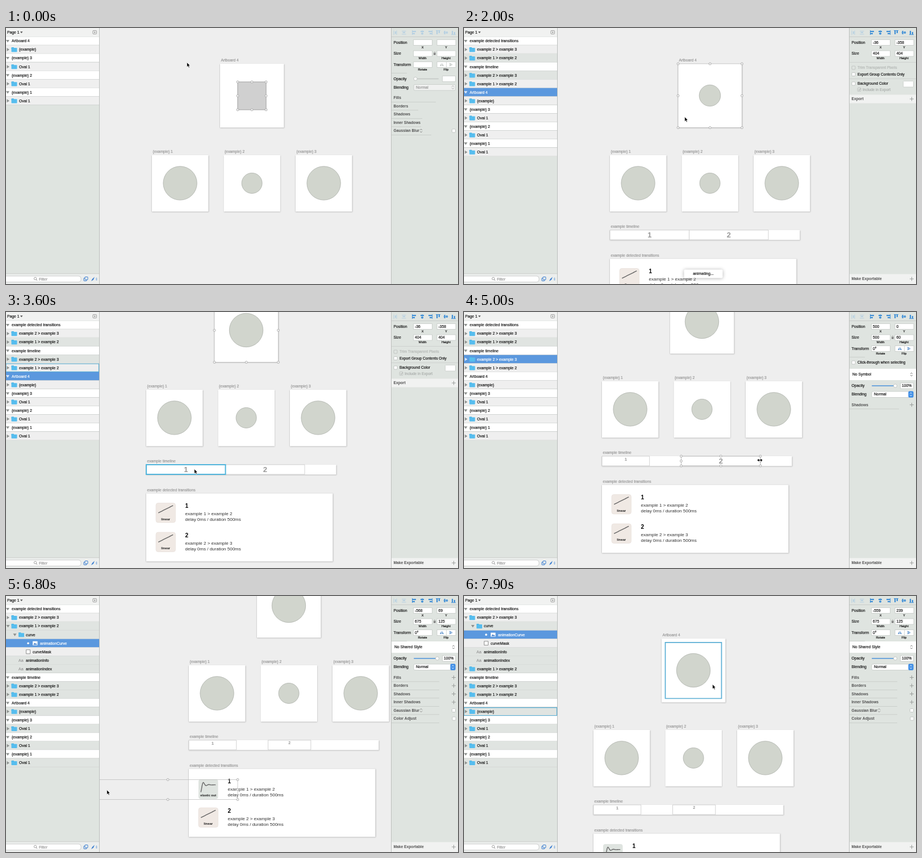
Animation of 796x451 px, one loop 8 s. Source, as an HTML page with a canvas:

```html
<!DOCTYPE html>
<html lang="en">
<head>
<meta charset="utf-8">
<title>Timeline editing</title>
<style>
html, body { margin: 0; width: 100%; height: 100%; overflow: hidden; background: #eee; }
canvas { display: block; width: 796px; height: 451px; }
</style>
</head>
<body>
<canvas id="stage" width="796" height="451"></canvas>
<script>
const c = document.getElementById('stage').getContext('2d');
const LOOP = 8000, STEP = 100;
const FONT = '"Liberation Sans", Arial, sans-serif';
const BLUE = '#5aaed4', PANEL = '#dfe4e0', INK = '#1a1a1a', GREY = '#999';
const SHAPE = '#d1d5cd', EDGE = '#adb0aa';
const UNIT = 0.279; // stage pixels per document unit

// Motion tables: [time, values...], linear between rows
const SCROLL = [[0, 0, 0], [2500, 0, 0], [2700, -8, -42], [2800, -24, -75], [3100, -10, -87],
  [3600, -10, -87], [4000, -14, -102], [5500, -14, -102], [5900, 65, -102], [7400, 65, -102], [7800, -29, 12]];
const POINTER = [[0, 319, 61], [300, 319, 61], [1000, 444, 115], [1500, 444, 115], [2300, 356, 182], [2800, 356, 182],
  [3500, 332, 277], [3700, 332, 277], [3900, 332, 261], [4200, 383, 261], [4500, 327, 261], [4700, 450, 261],
  [4900, 521, 261], [5000, 521, 261], [5400, 457, 261], [6000, 354, 342], [6300, 354, 342], [6700, 178, 342],
  [6800, 178, 342], [7000, 356, 389], [7300, 180, 389], [7500, 180, 389], [7900, 438, 156]];
const RADIUS = [[1000, 29.7], [1200, 29.7], [1950, 18], [2700, 29.7]];
const WIDTH1 = [[4200, 500], [4500, 300]];
const WIDTH2 = [[5000, 500], [5400, 270]];
const DRAG1 = [[6300, 0], [6700, -176]];
const DRAG2 = [[7000, 0], [7300, -176]];

function at(keys, t) {
  let i = keys.findIndex(k => k[0] > t);
  if (i === 0) return keys[0].slice(1);
  if (i < 0) return keys[keys.length - 1].slice(1);
  const a = keys[i - 1], b = keys[i], p = (t - a[0]) / (b[0] - a[0]);
  return a.slice(1).map((v, n) => v + (b[n + 1] - v) * p);
}

// Picks the value of the last step that has begun
const pick = (steps, t) => steps.filter(s => s[0] <= t).pop()[1];

function text(s, x, y, size = 6.75, color = INK, bold = false, align = 'left') {
  c.font = `${bold ? 'bold ' : ''}${size}px ${FONT}`;
  c.textAlign = align;
  c.fillStyle = color;
  c.fillText(s, x, y + size * 0.35);
  if (bold || size > 7.5) return;
  // Small labels are a little heavier than regular
  c.strokeStyle = color;
  c.lineWidth = 0.2;
  c.strokeText(s, x, y + size * 0.35);
}

function rect(x, y, w, h, fill, stroke, r = 0, lw = 1) {
  c.beginPath();
  c.roundRect(x, y, w, h, r);
  if (fill) { c.fillStyle = fill; c.fill(); }
  if (stroke) { c.strokeStyle = stroke; c.lineWidth = lw; c.stroke(); }
}

function path(points, stroke, lw = 1, fill) {
  c.beginPath();
  points.forEach(([x, y]) => c.lineTo(x, y));
  if (fill) { c.closePath(); c.fillStyle = fill; c.fill(); }
  if (stroke) { c.strokeStyle = stroke; c.lineWidth = lw; c.stroke(); }
}

function disc(x, y, r, fill, stroke, lw = 1) {
  c.beginPath();
  c.arc(x, y, r, 0, 7);
  c.fillStyle = fill;
  c.fill();
  if (stroke) { c.strokeStyle = stroke; c.lineWidth = lw; c.stroke(); }
}

function shadowed(x, y, w, h, r = 0, blur = 2) {
  c.save();
  c.shadowColor = 'rgba(0,0,0,.32)';
  c.shadowBlur = blur;
  c.shadowOffsetY = 0.6;
  rect(x, y, w, h, '#fff', null, r);
  c.restore();
}

function artboard(name, x, y, w, h) {
  shadowed(x, y, w, h);
  text(name, x + 1.5, y - 6, 6.7, GREY);
}

function handles(x, y, w, h) {
  rect(x, y, w, h, null, '#b8b8b8', 0, 0.7);
  for (const i of [0, 0.5, 1]) for (const j of [0, 0.5, 1])
    if (i !== 0.5 || j !== 0.5) disc(x + w * i, y + h * j, 2, '#f4f4f4', '#a4a4a4', 0.8);
}

/* ---------- canvas ---------- */

const elastic = p => 1 - Math.pow(2, -9 * p) * Math.cos(p * 17);
const CURVES = [p => p, p => p * p, p => 1 - (1 - p) ** 2, p => p * p * (3 - 2 * p), p => 1 - (1 - p) ** 4, elastic];
const NAMES = ['linear', 'ease in', 'ease out', 'ease both', 'expo out', 'elastic out'];

function curveIcon(x, y, dx) {
  const dragged = dx < -170;
  c.save();
  rect(x, y + (dragged ? 1.5 : 0), 34.5, 34.5, dragged ? PANEL : '#f0e9e4', dragged ? null : '#e6ddd8', 4, 0.6);
  c.clip();
  CURVES.forEach((f, i) => {
    const left = x + dx + i * 35.2, last = i === 5;
    if (Math.abs(left - x) > 35) return;
    const pts = [];
    for (let p = 0; p <= 1.001; p += 0.04)
      pts.push([left + 4.2 + p * 26, y + (last ? 24 - 12.8 * f(p) : 17.4 - 13 * f(p))]);
    path(pts, '#666', 1.4);
    text(NAMES[i], left + 17.2, y + (last ? 30 : 28), last ? 5.6 : 5.9, INK, true, 'center');
  });
  c.restore();
}

function transition(n, x, y, dx) {
  curveIcon(x, y, dx);
  text(n, x + 51.4, y + 5.3, 10, '#000', true);
  text(`example ${n} > example ${n + 1}`, x + 51.5, y + 18.8, 8, '#333');
  text('delay 0ms / duration 500ms', x + 51.5, y + 28.8, 8, '#333');
}

function bar(n, x, y, units) {
  const w = units * UNIT, k = units / 500;
  rect(x, y, w, 17, '#fff', '#c8c8c8', 0, 0.8);
  text(n, x + w / 2, y + 8.3 * k, 13 * k, GREY, true, 'center');
}

function drawCanvas(t) {
  const [ox, oy] = at(SCROLL, t).map(Math.round);
  const built = t >= 500;
  c.fillStyle = '#eee';
  c.fillRect(0, 0, 796, 451);
  c.save();
  c.translate(ox, oy);

  artboard('Artboard 4', 377, 63, 112.5, 112.5);
  if (!built) {
    rect(408, 95, 50, 49, '#d0d0d0', '#aaa');
    handles(408, 95, 50, 49);
  } else {
    const shift = t < 1100 ? 25 : 0;
    disc(433 + shift, 119 + shift, at(RADIUS, t)[0], SHAPE, EDGE, 0.8);
    if (t < 3900) handles(377, 63, 112.5, 112.5);
    if (t >= 900 && t < 1100) rect(408, 94.5, 99, 98.5, null, BLUE, 0, 1.7);
    if (t >= 7800) rect(383.5, 69.8, 99, 98.7, null, BLUE, 0, 1.7);
  }

  [257, 383.5, 510].forEach((x, i) => {
    artboard(`{example} ${i + 1}`, x, 224, 99.5, 99.5);
    disc(x + 49.6, 273.4, i === 1 ? 18 : 29.7, SHAPE, EDGE, 0.8);
  });

  if (built) {
    const w1 = at(WIDTH1, t)[0], w2 = at(WIDTH2, t)[0], y = 356;
    artboard('example timeline', 257, y, 334.5, 17.5);
    bar(1, 257, y, w1);
    bar(2, 396.5, y, w2);
    if (t >= 3500 && t < 3900) rect(257, y, 139.5, 17, null, '#52b5dc', 0, 2);
    if (t >= 3900 && t < 4700) handles(257, y, w1 * UNIT, 17);
    if (t >= 4700 && t < 6200) handles(396.5, y, w2 * UNIT, 17);

    artboard('example detected transitions', 257, 406.5, 328.5, 120);
    const d1 = at(DRAG1, t)[0], d2 = at(DRAG2, t)[0];
    transition(1, 274, 423.5, d1);
    transition(2, 274, 475, d2);
    if (t >= 6200) handles(273 + (t < 7000 ? d1 : d2), t < 7000 ? 425.5 : 477, 246, 35);
  }
  c.restore();

  if (t >= 700 && t < 3100) {
    shadowed(387.5, 425.5, 68, 15, 2, 6);
    text('animating...', 421.5, 433, 7.1, INK, false, 'center');
  }
}

/* ---------- layer list ---------- */

const PAIRS = ['example 2 > example 3', 'example 1 > example 2'];
const INNER = [['curve', 'sub'], ['animationCurve', 'image'], ['curveMask', 'mask'], ['animationInfo', 'type'], ['animationIndex', 'type']];

// Each row: [name, kind, dark]
function layerRows(built, open) {
  const rows = [], dark = open >= 0;
  if (built) {
    rows.push(['example detected transitions', 'board']);
    PAIRS.forEach((p, i) => {
      rows.push([p, i === open ? 'open' : 'folder', i === 1]);
      if (i === open) rows.push(...INNER);
    });
    rows.push(['example timeline', 'board'], [PAIRS[0], 'folder', true], [PAIRS[1], 'folder', dark]);
  }
  rows.push(['Artboard 4', 'board'], ['{example}', 'folder', dark]);
  for (const n of [3, 2, 1]) rows.push([`{example} ${n}`, 'board'], ['Oval 1', 'folder', dark]);
  return rows;
}

function arrow(x, y, down, color = '#8d918f') {
  path(down ? [[x - 3, y - 2], [x + 3, y - 2], [x, y + 2.5]] : [[x - 2, y - 3], [x + 2.5, y], [x - 2, y + 3]], null, 0, color);
}

function folder(x, y) {
  rect(x, y - 4, 4.5, 3, '#45b0e2', null, 0.6);
  rect(x, y - 3, 10, 7.2, '#56bdee', null, 0.8);
}

function layerRow([name, kind, dark], y, selected, hover) {
  const h = 15.05, top = y - 7.5, ink = selected ? '#fff' : INK;
  let fill = kind === 'board' ? '#fff' : dark || kind === 'type' || kind === 'sub' ? '#e0e4e1' : '#efefef';
  if (selected) fill = '#5b98de';
  rect(0, top, 164, h, fill);
  rect(0, top + h - 0.8, 164, 0.8, kind === 'board' ? '#c3c6c4' : '#d3d6d4');
  const tri = selected ? '#dfeafa' : undefined;
  let x = 23;
  if (kind === 'board') { x = 10; arrow(3, y, true, tri); }
  if (kind === 'folder' || kind === 'open') { arrow(3.5, y, kind === 'open', tri); folder(9.5, y); }
  if (kind === 'sub') { x = 35; arrow(15.5, y, true); folder(22, y); }
  if (kind === 'image') {
    x = 60;
    disc(39, y, 1.8, '#fff');
    rect(47, y - 3.5, 8.5, 7, '#fff');
    path([[48, y + 2.5], [50.5, y - 1], [52, y + 1], [53, y], [55, y + 2.5]], null, 0, '#4b86cf');
  }
  if (kind === 'mask') { x = 47; rect(35.5, y - 3.5, 7, 7, '#fff', '#777', 0, 0.8); }
  if (kind === 'type') { x = 35; text('Aa', 22, y, 7, GREY); }
  text(name, x, y, 6.75, ink);
  if (hover) rect(0, top + 0.5, 163.5, h - 1, null, BLUE, 0, 1.2);
}

function magnifier(x, y) {
  disc(x, y - 0.5, 2.2, '#fff', '#888', 0.8);
  path([[x + 1.6, y + 1.2], [x + 3.5, y + 3]], '#888');
}

function drawLayers(t) {
  rect(0, 0, 164, 451, PANEL);
  rect(0, 0, 164, 15.5, '#f1f2f1');
  text('Page 1', 2, 7.5);
  path([[25, 6.2], [29.5, 6.2], [27.2, 9.2]], null, 0, '#555');
  rect(153, 4.5, 6.5, 6, null, '#888', 1, 0.8);
  path([[154.8, 6.8], [157.8, 6.8], [156.3, 9]], null, 0, '#777');
  rect(0, 15, 164, 0.8, '#c3c6c4');

  const open = pick([[0, -1], [6200, 1], [7000, 0]], t);
  const selected = pick([[0, -1], [500, 6], [3900, 5], [4700, 4], [7000, 3]], t);
  const hover = pick([[0, -1], [3500, 5], [3900, -1], [7800, 12]], t);
  layerRows(t >= 500, open).forEach((row, i) => layerRow(row, 23 + i * 15.05, i === selected, i === hover));

  rect(0, 433, 164, 18, '#eceeed');
  rect(0, 432.5, 164, 0.8, '#c3c6c4');
  rect(-4, 437, 136, 10.5, '#fff', '#c3c6c4', 4, 0.8);
  magnifier(51.5, 442);
  text('Filter', 58, 442.3, 6.75, GREY);
  rect(137, 440.5, 5, 5, '#eceeed', '#3c7fd0', 0.5);
  rect(139, 438.5, 5, 5, '#eceeed', '#3c7fd0', 0.5);
  path([[150, 446], [152, 442], [156, 438.5], [154, 443.5]], null, 0, '#3c7fd0');
  path([[158, 441.6], [160.8, 441.6], [159.4, 440]], null, 0, '#3c7fd0');
  path([[158, 443], [160.8, 443], [159.4, 444.6]], null, 0, '#3c7fd0');
  rect(164, 0, 1, 451, '#bcbfbd');
}

/* ---------- inspector ---------- */

function field(x, y, value, w = 33) {
  rect(x, y - 5, w, 10, '#fff', '#c5c9c6', 0, 0.8);
  text(value, x + 2.5, y);
}

const caption = (s, x, y) => text(s, x, y, 5.5, INK, false, 'center');
const check = (y, x = 683, fill = '#fff') => rect(x, y - 3, 6, 6, fill, '#b9bdba', 1, 0.8);

function plus(y) {
  path([[785, y], [792, y]], '#929694', 0.9);
  path([[788.5, y - 3.5], [788.5, y + 3.5]], '#929694', 0.9);
}

function updown(x, y, color = '#666') {
  path([[x - 2, y - 1], [x, y - 3], [x + 2, y - 1]], color, 0.8);
  path([[x - 2, y + 1], [x, y + 3], [x + 2, y + 1]], color, 0.8);
}

function heading(s, y, add, line) {
  text(s, 682.5, y, 6.7, '#505050', true);
  if (add) plus(y);
  if (line) rect(679, y + 7, line, 0.7, '#c3c8c4');
}

function geometry([x, y, w, h], rotate) {
  text('Position', 682.5, 25.5);
  field(717.5, 25.5, x);
  field(759, 25.5, y);
  caption('X', 733.5, 34);
  caption('Y', 775, 34);
  text('Size', 682.5, 45);
  field(717.5, 45, w);
  field(759, 45, h);
  caption('Width', 733.5, 53.5);
  caption('Height', 775, 53.5);
  if (rotate === undefined) return;
  rect(753, 44.5, 3.6, 2.8, '#777');
  rect(753.6, 42.5, 2.4, 3, null, '#777', 1, 0.7);
  text('Transform', 682.5, 64.5);
  field(717.5, 64.5, rotate);
  field(759, 64.5, '');
  const ink = rotate ? '#6b9bd0' : '#c6cbc8';
  rect(775, 60, 0.7, 9, '#c5c9c6');
  path([[764, 67], [767, 67], [767, 61.5]], null, 0, ink);
  path([[771, 67], [768, 67], [768, 61.5]], null, 0, ink);
  path([[781, 61.5], [781, 64.2], [787, 64.2]], null, 0, ink);
  path([[781, 67.5], [781, 64.8], [787, 64.8]], null, 0, ink);
  caption('Rotate', 733.5, 73);
  caption('Flip', 775, 73.5);
  rect(679, 79, 27, 0.7, '#c3c8c4');
}

function blend(y, on) {
  text('Opacity', 682.5, y);
  rect(718, y - 0.8, 44, 1.6, on ? '#4b93dc' : '#c3c7c4', null, 1);
  disc(on ? 759.5 : 721, y, 3, '#fff', '#b9bdba', 0.8);
  field(768.5, y, on ? '100%' : '', 23);
  text('Blending', 682.5, y + 15);
  rect(718, y + 10, 73.5, 10.5, on ? '#fff' : '#f0f1f0', '#c5c9c6', 2, 0.8);
  text('Normal', 722, y + 15, 6.75, on ? INK : GREY);
  if (on) rect(782.5, y + 9.6, 9, 11.2, '#3f8ee6', null, 2);
  updown(787, y + 15, on ? '#fff' : GREY);
}

function choice(s, y) {
  rect(679, y - 10, 117, 20, '#fff');
  text(s, 684, y);
  updown(788, y);
}

function effects(y, on) {
  ['Fills', 'Borders', 'Shadows', 'Inner Shadows', 'Gaussian Blur'].forEach((s, i) =>
    heading(s, y + i * 14.5, on && i < 4, on ? 84 : [78, 47, 54, 52, 70][i]));
  updown(731, y + 58, '#777');
  check(y + 58, 785.5);
  if (on) {
    heading('Color Adjust', y + 72.5, false, 84);
    check(y + 72.5, 786);
  }
}

function alignIcons(on) {
  const pale = '#b4cfe2', main = on ? '#3f8fd6' : pale;
  for (const dx of [-3, 2]) rect(685.5 + dx, 4.5, 0.9, 7.5, pale);
  rect(685, 6, 1.7, 4.5, pale);
  for (const dy of [5, 10.5]) rect(697, dy, 7.5, 0.9, pale);
  rect(698.5, 7, 4.5, 1.8, pale);
  [719, 733, 747].forEach((x, i) => {
    rect(x - 4 + i * 3.6, 4, 1, 8, main);
    rect(x - 3, 5, 6, 2.2, main);
    rect(x - 3 + i, 8.8, 4, 2.2, main);
  });
  [761, 774.5, 788].forEach((x, i) => {
    rect(x - 4, 4 + i * 3.6, 8, 1, main);
    rect(x - 3, 5, 2.2, 6, main);
    rect(x + 0.8, 5 + i, 2.2, 4, main);
  });
}

function boardPanel() {
  geometry(['-36', '-358', '404', '404']);
  rect(679, 60, 117, 0.7, '#c9cdca');
  check(70, 683, PANEL);
  text('Trim Transparent Pixels', 693, 70, 6.6, '#b3b7b4');
  check(81.5);
  text('Export Group Contents Only', 693, 81.5, 6.6);
  rect(679, 89, 117, 0.7, '#c9cdca');
  check(98);
  text('Background Color', 693, 98, 6.75);
  rect(773.5, 93.5, 18, 10.5, '#fff', '#c5c9c6', 1, 0.8);
  check(108.5, 693, PANEL);
  path([[694.5, 108.5], [696, 110], [698.5, 106.5]], '#999', 0.8);
  text('Include in Export', 702, 108.5, 6.6, '#aaaeab');
  rect(679, 117.5, 117, 15, '#f1f2f1');
  heading('Export', 125, true);
}

function drawInspector(t) {
  rect(678, 0, 118, 451, PANEL);
  alignIcons(t >= 500);
  rect(678, 15, 118, 0.8, '#c3c6c4');
  if (t < 500) {
    geometry(['', '', '', ''], '');
    blend(89.5, false);
    effects(123, false);
  } else if (t < 3900) {
    boardPanel();
  } else if (t < 6200) {
    const first = t < 4700;
    const w = Math.round(at(first ? WIDTH1 : WIDTH2, t)[0]);
    geometry([first ? '0' : '500', '0', w, '60'], '0°');
    check(89);
    text('Click-through when selecting', 693, 89, 6.6);
    choice('No Symbol', 110);
    blend(130, true);
    heading('Shadows', 163.5, true, 87);
  } else {
    geometry(t < 7000 ? ['-568', '69', '675', '125'] : ['-559', '239', '675', '125'], '0°');
    choice('No Shared Style', 90);
    blend(110, true);
    effects(143.5, true);
  }
  if (t >= 500) {
    rect(679, 433.5, 117, 17.5, '#f1f2f1');
    heading('Make Exportable', 442, true);
  }
  rect(678, 0, 1, 451, '#bcbfbd');
}

/* ---------- pointer ---------- */

function drawPointer(t) {
  const [x, y] = at(POINTER, t);
  const sizing = (t >= 4200 && t <= 4500) || (t >= 4900 && t <= 5400);
  if (sizing) {
    path([[x - 3, y], [x + 3, y]], '#000', 1.2);
    for (const s of [-1, 1]) path([[x + s * 4.5, y], [x + s * 1.8, y - 2.5], [x + s * 1.8, y + 2.5]], null, 0, '#000');
    return;
  }
  const tip = [[0, 0], [0, 8.2], [1.9, 6.5], [3.2, 9.4], [4.7, 8.7], [3.4, 5.9], [5.8, 5.8], [0, 0]];
  path(tip.map(([a, b]) => [x + a - 0.4, y + b - 0.4]), '#fff', 0.7, '#000');
}

function frame(now) {
  const t = Math.floor((now % LOOP) / STEP) * STEP;
  drawCanvas(t);
  drawLayers(t);
  drawInspector(t);
  drawPointer(t);
  requestAnimationFrame(frame);
}

frame(0);
</script>
</body>
</html>
```
